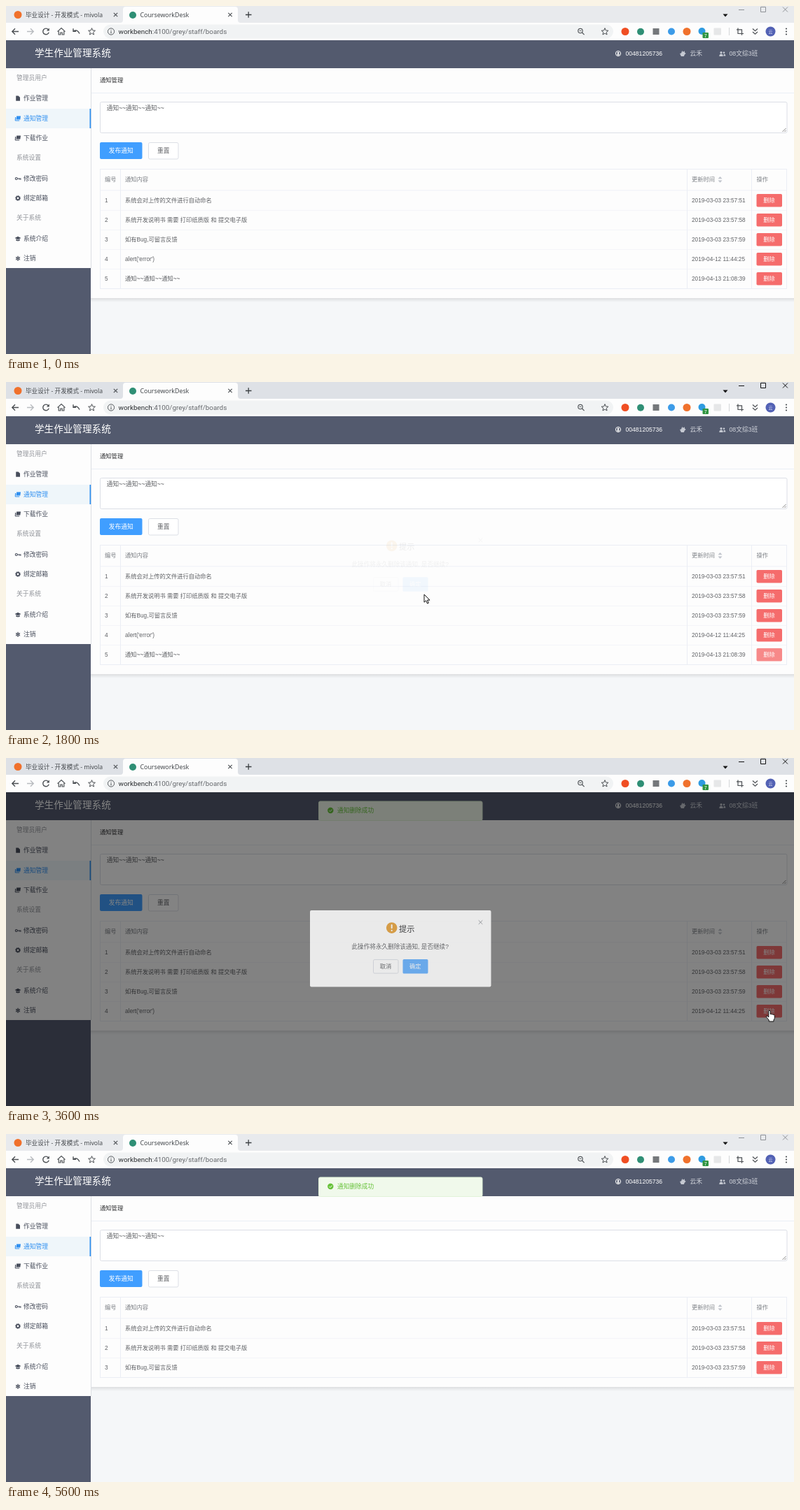
Recreate the animation shown at these times as an HTML page. Size 1125 by 498 pixels, loop 5700 ms.

```html
<!DOCTYPE html>
<html lang="zh-CN">
<head>
<meta charset="utf-8">
<title>通知管理</title>
<style>
  html, body { margin: 0; width: 100%; height: 100%; overflow: hidden; background: #fdfdfd; }
  svg { display: block; width: 100%; height: 100%; }
  text { font-family: "Liberation Sans", "Noto Sans CJK SC", "Noto Sans CJK", sans-serif; white-space: pre; }
  text.ui { font-family: "Noto Sans", "Noto Sans CJK SC", "Noto Sans CJK", sans-serif; }
  text.url { font-family: Roboto, sans-serif; }
</style>
</head>
<body>
<svg id="stage" viewBox="0 0 1125 498" xmlns="http://www.w3.org/2000/svg">
  <defs>
    <clipPath id="page"><rect x="0" y="49" width="1125" height="449"/></clipPath>
    <linearGradient id="shade" x1="0" y1="0" x2="0" y2="1">
      <stop offset="0" stop-color="#000" stop-opacity=".1"/>
      <stop offset="1" stop-color="#000" stop-opacity="0"/>
    </linearGradient>
  </defs>
</svg>
<script>
const LOOP = 5700, STEP = 100;
const SLATE = '#535a6e', WHITE = '#fdfdfd', BLUE = '#409eff', LINE = '#ebeef5';
const RED = '#f56c6c', PINK = '#f78989', INK = '#606266', MUTED = '#909399';
const stage = document.getElementById('stage');
let layer = stage;

// ---------- drawing helpers ----------
function el(tag, attrs, parent = layer) {
  const e = document.createElementNS('http://www.w3.org/2000/svg', tag);
  for (const k in attrs) e.setAttribute(k, attrs[k]);
  parent.appendChild(e);
  return e;
}
const rect = (x, y, width, height, fill, more) => el('rect', { x, y, width, height, fill, ...more });
const dot = (cx, cy, r, fill, more) => el('circle', { cx, cy, r, fill, ...more });
const fillPath = (d, fill) => el('path', { d, fill });
const stroke = (d, color = '#4c5054', w = 1.2) =>
  el('path', { d, fill: 'none', stroke: color, 'stroke-width': w });
function text(x, mid, size, fill, str, more) {
  const e = el('text', { x, y: mid + size * 0.36, 'font-size': size, fill, ...more });
  e.textContent = str;
  return e;
}
const cross = (x, y, r, color, w) =>
  stroke(`M${x - r} ${y - r}l${2 * r} ${2 * r}m0 ${-2 * r}l${-2 * r} ${2 * r}`, color, w);
function group(draw, parent = layer) {
  const keep = layer, g = el('g', {}, parent);
  layer = g;
  draw(g);
  layer = keep;
  return g;
}
function star(cx, cy) {
  let d = '';
  for (let i = 0; i < 10; i++) {
    const a = i * Math.PI / 5 - Math.PI / 2, r = i % 2 ? 2.3 : 5.2;
    d += (i ? 'L' : 'M') + (cx + r * Math.cos(a)).toFixed(2) + ' ' + (cy + r * Math.sin(a)).toFixed(2);
  }
  stroke(d + 'Z', '#4c5054', 1);
}

// ---------- browser frame ----------
const strip = rect(0, 0, 1125, 24, '#e8eaed');
fillPath('M163 24q4 0 4-4V5q0-4 4-4h156q4 0 4 4v15q0 4 4 4z', WHITE);
rect(0, 24, 1125, 25, WHITE);
dot(17, 12.5, 5.5, '#f0712c');
text(28, 13, 8.6, '#45494d', '毕业设计 - 开发模式 - mivola', { class: 'ui' });
cross(156.5, 12.5, 2.7, '#4c5054', 1.1);
dot(181, 13, 5, '#2f8f75');
text(191.5, 13, 8.8, '#45494d', 'CourseworkDesk', { class: 'ui' });
cross(320, 12.5, 2.7, '#4c5054', 1.1);
stroke('M342 12.5h8.5M346.2 8.2v8.5', '#3c4043', 1.3);
fillPath('M1023.5 11.5h7l-3.5 4z', '#111');
const controls = group(() => {
  stroke('M1046 5.5h8M1077.5 1.5h7v7h-7zM1109 1.5l7 7m0-7l-7 7', 'inherit', 1).removeAttribute('stroke');
});

rect(139, 26.5, 728, 20, '#f1f3f4', { rx: 10 });
stroke('M18 36.5H9M13 32.3L8.8 36.5 13 40.7', '#4c5054', 1.4);
stroke('M30 36.5h9M35 32.3l4.2 4.2-4.2 4.2', '#b9bcc0', 1.4);
stroke('M60.4 33.7A4.3 4.3 0 1 0 61.2 37.6', '#4c5054', 1.4);
fillPath('M61.8 31.5v4h-4z', '#4c5054');
stroke('M73.5 36.6L79 31.6l5.5 5M75.2 36v5h2.6v-3h2.4v3h2.6v-5', '#4c5054', 1.2);
stroke('M96.5 36q5-3.5 8.5 3.5M96 32.2v4h4', '#4c5054', 1.4);
star(122.5, 36.8);
dot(150, 36.5, 4.6, 'none', { stroke: '#55595d', 'stroke-width': 1 });
stroke('M150 34v1M150 36v3.2', '#55595d', 1.1);
const url = text(160.5, 36.5, 9.9, '#66696d', '', { class: 'url' });
el('tspan', { fill: '#2b2e31' }, url).textContent = 'workbench';
el('tspan', {}, url).textContent = ':4100/grey/staff/boards';
dot(820, 35.5, 3.2, 'none', { stroke: '#55595d', 'stroke-width': 1.2 });
stroke('M822.4 38l3.2 3.2M818.6 35.5h2.8', '#55595d', 1.2);
star(855, 36.8);
dot(884, 36.5, 5.5, '#f04e23');
dot(906, 36.8, 5, '#2f8f75');
rect(923.5, 32, 9, 9, '#75787b');
dot(950, 36.5, 5, '#3c9be8');
dot(972, 36.5, 5.5, '#f0712c');
dot(993.5, 36, 5, '#2f9be0');
rect(994.5, 38, 8.5, 8, '#2f9440', { rx: 1 });
text(996.8, 42, 7, '#fff', '7');
rect(1010.5, 31.5, 10.5, 10, '#e6e7e8', { rx: 1 });
rect(1032, 31, 1, 11, '#d4d6d9');
stroke('M1045 31.5v8h8M1043 33.8h7.5v8', '#4c5054', 1.2);
stroke('M1066 32.5l3.5 3.2 3.5-3.2M1066 37l3.5 3.2 3.5-3.2', '#4c5054', 1.2);
dot(1091.5, 36.5, 7, '#5261b4');
text(1088.5, 36.5, 6, '#dfe3f5', '云');
[32.5, 36.5, 40.5].forEach(y => dot(1114, y, 1.1, '#4c5054'));

// ---------- page ----------
layer = el('g', { 'clip-path': 'url(#page)' });
rect(0, 49, 1125, 449, '#f5f7f9');
const card = rect(121, 89, 1004, 329, WHITE);
const shadow = rect(121, 418, 1004, 6, 'url(#shade)');

rect(0, 49, 1125, 40, SLATE);
text(41, 67.5, 13.6, '#fff', '学生作业管理系统');
dot(874, 68, 3.6, 'none', { stroke: '#fff', 'stroke-width': 1 });
dot(874, 67, 1.3, '#fff');
rect(872.2, 68.6, 3.6, 2, '#fff', { rx: 1 });
text(884.5, 67.5, 8.6, '#fff', '00481205736');
fillPath('M962 68l2-.6 1.3-3.4 1.4 1.8 2-1.5.3 2.4 1.7 1-2 2-.8 2.3h-4z', '#c5c9d2');
text(976.5, 67.5, 8.75, '#d3d6dd', '云禾');
dot(1021, 66.5, 1.6, '#c5c9d2');
dot(1025, 66.8, 1.3, '#c5c9d2');
fillPath('M1018.3 72q0-3.6 2.7-3.6t2.7 3.6zM1024.3 71.5q0-2.8 1-2.8 2 0 2 2.8z', '#c5c9d2');
text(1032.5, 67.5, 8.75, '#d3d6dd', '08文综3班');

// sidebar
rect(0, 89, 121, 409, SLATE);
rect(0, 89, 121, 286, WHITE);
rect(121, 89, 1, 286, '#dcdfe3');
rect(0, 147, 121, 28, '#eff6fa');
rect(119.5, 147, 1.7, 28, '#2f8ff0');
const icons = {
  file: (y, c) => fillPath(`M14.2 ${y - 3.6}h3.4l2.4 2.4v5h-5.8z`, c),
  books: (y, c) => {
    fillPath(`M15.2 ${y - 3.5}h5.8l-.7 5h-5.8z`, c);
    stroke(`M13.6 ${y - 2}l-.4 5h6`, c, 1);
  },
  key: (y, c) => {
    dot(14.8, y + .5, 1.5, 'none', { stroke: c, 'stroke-width': 1.1 });
    stroke(`M16.3 ${y + .5}h4.6v1.8M19 ${y + .5}v1.5`, c, 1.1);
  },
  gear: (y, c) => {
    dot(17, y, 2.3, 'none', { stroke: c, 'stroke-width': 1.7 });
    dot(17, y, 3.4, 'none', { stroke: c, 'stroke-width': 1, 'stroke-dasharray': '1.35 1.32' });
  },
  cap: (y, c) => {
    fillPath(`M12.6 ${y - 1}l4.4-2.2 4.4 2.2-4.4 2.2z`, c);
    fillPath(`M14.3 ${y + .6}l2.7 1.3 2.7-1.3v1.8q-2.7 1.8-5.4 0z`, c);
  },
  flake: (y, c) => {
    stroke(`M17 ${y - 3.6}v7.2M13.9 ${y - 1.8}l6.2 3.6M20.1 ${y - 1.8}l-6.2 3.6`, c, 1);
    dot(17, y, 2.3, 'none', { stroke: c, 'stroke-width': .7 });
  }
};
[
  [102.5, '管理员用户'], [132, '作业管理', 'file'], [161, '通知管理', 'books'], [189, '下载作业', 'books'],
  [216.5, '系统设置'], [246.5, '修改密码', 'key'], [275, '绑定邮箱', 'gear'],
  [303, '关于系统'], [333, '系统介绍', 'cap'], [361.3, '注销', 'flake']
].forEach(([y, label, icon]) => {
  const color = !icon ? MUTED : y === 161 ? '#2f8ff0' : '#484e5c';
  if (icon) icons[icon](y, color);
  text(icon ? 25 : 15, y, 8.75, color, label);
});

// form
text(134, 106.5, 8.3, '#303133', '通知管理');
rect(122, 124, 1003, 1, LINE);
rect(134.5, 137.5, 980.5, 44, '#fff', { rx: 2, stroke: '#dcdfe6' });
text(143.8, 146, 8.65, INK, '通知~~通知~~通知~~');
stroke('M1108.5 180l5-5M1111.5 180l2-2', '#777', .9);
rect(134, 195, 60.5, 24, BLUE, { rx: 2 });
text(146.7, 207, 8.75, '#fff', '发布通知');
rect(203.5, 195.5, 42.5, 23.5, '#fff', { rx: 2, stroke: '#dcdfe6' });
text(216, 207, 8.75, INK, '重置');

// table
const TOP = 264, ROW = 28;
const COLS = [134, 163, 972, 1064, 1114];
rect(134, 233, 981, 1, LINE);
rect(134, 263.5, 981, 1, LINE);
COLS.forEach(x => rect(x, 233, 1, 31, LINE));
[[141, '编号'], [170, '通知内容'], [979, '更新时间'], [1071.5, '操作']]
  .forEach(([x, label]) => text(x, 248.3, 8.25, '#7d8086', label));
fillPath('M1016.5 247.3h6l-3-3.2zM1016.5 249.5h6l-3 3.2z', '#c0c4cc');
const rows = [
  ['系统会对上传的文件进行自动命名', '2019-03-03 23:57:51'],
  ['系统开发说明书 需要 打印纸质版 和 提交电子版', '2019-03-03 23:57:58'],
  ['如有Bug,可留言反馈'.replace(',', ','), '2019-03-03 23:57:59'],
  ["alert('error')", '2019-04-12 11:44:25'],
  ['通知~~通知~~通知~~', '2019-04-13 21:08:39']
].map(([body, time], i) => {
  const y = TOP + i * ROW, mid = y + 14, row = {};
  row.g = group(() => {
    row.bg = rect(134, y + .5, 981, ROW - .5, WHITE);
    rect(134, y + ROW, 981, 1, LINE);
    COLS.forEach(x => rect(x, y, 1, ROW, LINE));
    text(141, mid, 8.25, INK, i + 1);
    text(170, mid, 8.25, INK, body);
    text(979, mid, 8.25, INK, time);
    row.btn = rect(1071.5, y + 5, 36.5, 18.5, RED, { rx: 1.7 });
    text(1081.3, mid, 8.25, '#fff', '删除');
  });
  return row;
});

// toasts
const toasts = [[2390, 5390], [4890, LOOP]].map(([from, to]) => ({
  from, to,
  g: group(() => {
    rect(446.5, 62, 233.5, 27.5, '#f0f9eb', { rx: 2, stroke: '#e1f3d8' });
    dot(463.3, 75, 4.2, '#67c23a');
    stroke('M461.3 75.1l1.5 1.5 2.7-2.9', '#fff', 1);
    text(473, 75, 8.7, '#67c23a', '通知删除成功');
  })
}));

// dialog
const veil = rect(0, 49, 1125, 449, '#000');
let okBtn;
const dialog = group(() => {
  rect(434, 220, 258.5, 109.5, '#fff', { rx: 2 });
  dot(550.7, 245, 7.8, '#e6a23c');
  rect(549.7, 240, 2, 6.2, '#fff', { rx: 1 });
  dot(550.7, 248.8, 1.1, '#fff');
  text(561, 246.8, 11.2, '#303133', '提示');
  cross(677.5, 237, 2.8, MUTED, .9);
  text(493.5, 272, 8.6, INK, '此操作将永久删除该通知, 是否继续?');
  rect(524.5, 290.5, 35.5, 19.5, '#fff', { rx: 1.7, stroke: '#dcdfe6' });
  text(533.7, 300, 8.25, INK, '取消');
  okBtn = rect(566.5, 290, 36, 20.5, '#66b1ff', { rx: 1.7 });
  text(576, 300, 8.25, '#fff', '确定');
});

// pointer, hot spot at 0,0
layer = stage;
const outline = (d, parent) =>
  el('path', { d, fill: '#fff', stroke: '#111', 'stroke-width': 1, 'stroke-linejoin': 'round' }, parent);
const pointer = group(() => {});
const arrow = outline('M0 0V11.2L2.6 8.8 4.5 13 6.3 12.2 4.5 8.1H8z', pointer);
const hand = outline('M-1.2 9V1Q0-.8 1.2 1V5.6Q2.6 4.6 3.4 6 4.8 5.2 5.5 6.5 7 6 7.3 7.6V11.5L6 14V16H-.8V14L-4.6 9.4Q-4-7.6 -4 8.2-2.6 8-1.2 10z'
  .replace('-4-7.6', '-4.4 7.6'), pointer);

// ---------- motion ----------
// time, x, y of the pointer tip
const path = [
  [100, 1000, 172], [300, 1060, 300], [400, 1082, 396], [500, 1089, 386], [1000, 1089, 386],
  [1450, 589, 296], [1600, 589, 296], [1800, 597, 304], [2300, 900, 350], [2700, 1088, 376],
  [3000, 1088, 374], [3200, 1090, 361], [3700, 1090, 361], [4150, 578, 298], [4500, 578, 298],
  [4800, 697, 246], [5100, 930, 110]
];
const dialogs = [[760, 1600], [3440, 4290]];
const cuts = [2500, 5000];

// the CSS "ease" curve
function ease(p) {
  if (p <= 0) return 0;
  if (p >= 1) return 1;
  let lo = 0, hi = 1, u;
  for (let i = 0; i < 20; i++) {
    u = (lo + hi) / 2;
    const x = .75 * u * (1 - u) + u * u * u;
    x < p ? lo = u : hi = u;
  }
  return .3 * u * (1 - u) ** 2 + 3 * u * u * (1 - u) + u ** 3;
}
const fade = (t, [from, to], ms) => ease((t - from) / ms) - ease((t - to) / ms);

function tip(t) {
  const i = path.findIndex(p => p[0] > t);
  if (i < 1) return t === path[path.length - 1][0] ? path[path.length - 1].slice(1) : null;
  const [t0, x0, y0] = path[i - 1], [t1, x1, y1] = path[i];
  let p = (t - t0) / (t1 - t0);
  p = p * p * (3 - 2 * p);
  return [x0 + (x1 - x0) * p, y0 + (y1 - y0) * p];
}
const inside = ([x, y], l, top, w, h) => x >= l && x <= l + w && y >= top && y <= top + h;
const show = (e, on) => e.setAttribute('visibility', on ? 'inherit' : 'hidden');
const put = (e, name, value) => e.setAttribute(name, value);

function render(t) {
  const focused = t >= 700 && t < 5600;
  put(strip, 'fill', focused ? '#dee1e6' : '#e8eaed');
  put(controls, 'stroke', focused ? '#111' : '#8f9296');

  const count = 5 - cuts.filter(c => t >= c).length;
  const bottom = TOP + count * ROW + 14;
  put(card, 'height', bottom - 89);
  put(shadow, 'y', bottom);

  const open = dialogs.find(([a, b]) => t >= a && t < b + 300);
  const k = open ? fade(t, open, 300) : 0;
  put(veil, 'opacity', open ? .5 * fade(t, open, 200) : 0);
  put(dialog, 'opacity', k);
  put(dialog, 'transform', `translate(0 ${-11.5 * (1 - k)})`);
  const pressed = open && t >= open[1] - 100 && t <= open[1];
  put(okBtn, 'fill', pressed ? '#3a8ee6' : '#66b1ff');

  const at = tip(t);
  let link = at && k > .3 && inside(at, 566, 290, 37, 21);
  rows.forEach((row, i) => {
    const y = TOP + i * ROW, live = i < count;
    const over = at && live && inside(at, 1071, y + 5, 37, 19);
    const hover = at && !open && inside(at, 134, y, 981, ROW - .1);
    const refocus = dialogs.some(([, b], j) => i === 4 - j && t > b && t < cuts[j]);
    show(row.g, live);
    put(row.bg, 'fill', hover ? '#f5f7fa' : WHITE);
    put(row.btn, 'fill', refocus || (over && !open) ? PINK : RED);
    link = link || over;
  });

  toasts.forEach(({ g, from, to }) => {
    show(g, t >= from && t < to);
    put(g, 'opacity', ease((t - from) / 300));
    put(g, 'transform', `translate(0 ${-28 * (1 - ease((t - from) / 400))})`);
  });

  show(pointer, at);
  if (at) put(pointer, 'transform', `translate(${at[0]} ${at[1]})`);
  put(arrow, 'display', link ? 'none' : 'inline');
  put(hand, 'display', link ? 'inline' : 'none');
}

const start = performance.now();
function tick() {
  const t = (performance.now() - start) % LOOP;
  render(Math.floor(t / STEP) * STEP);
  requestAnimationFrame(tick);
}
tick();
</script>
</body>
</html>
```
